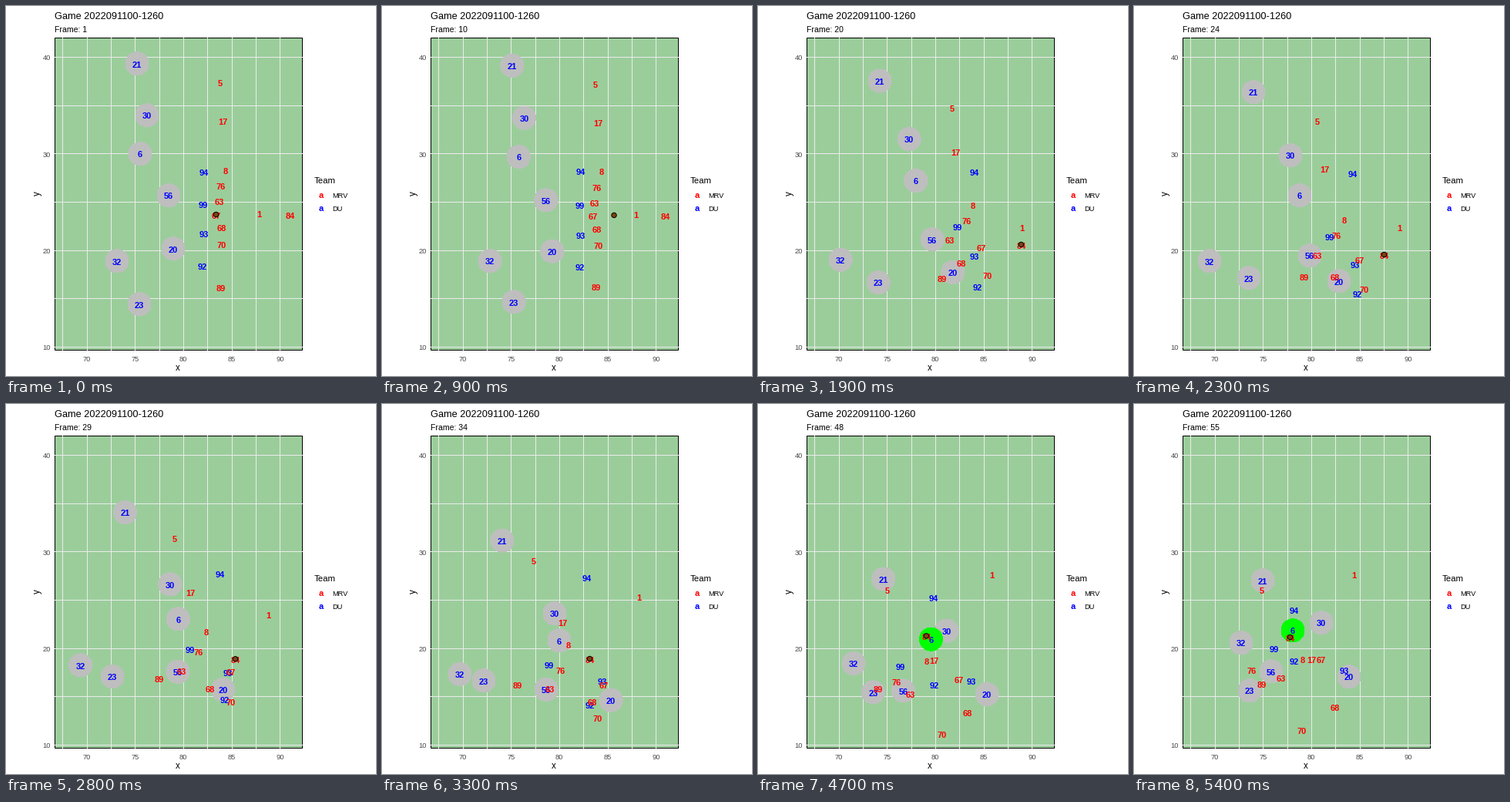
These frames come from a looping animation (480x480 px, 5.5 s). A matplotlib script:

```python
import numpy as np
import matplotlib.pyplot as plt
from matplotlib.animation import FuncAnimation
from matplotlib.patches import Circle, Rectangle

plt.rcParams["font.family"] = "Liberation Sans"

SIZE, DPI = 480, 72           # at 72 dpi one point is one pixel
FRAMES, INTERVAL = 55, 100
YARD = 12.53                  # pixels per yard
START, SNAP, CUT, HIT, END = 0, 7, 23, 40, 54
TURN = 33                     # extra turning point of those near the ball
REACH = 1.5 * YARD            # a defender this close to the ball turns green
RED, BLUE, GREY, GREEN = "#FF0000", "#0000FF", "#BEBEBE", "#00FF00"

fig = plt.figure(figsize=(SIZE / DPI, SIZE / DPI), dpi=DPI, facecolor="white")
ax = fig.add_axes([0, 0, 1, 1])
ax.set_xlim(0, SIZE)
ax.set_ylim(SIZE, 0)
ax.axis("off")


def px(x):
    return 104.7 + YARD * (x - 70)


def py(y):
    return 66.5 + YARD * (40 - y)


def write(x, y, text, size, color="black", ha="left", **kw):
    """Place text by its baseline."""
    return ax.text(x, y, text, size=size, color=color, ha=ha, va="baseline", **kw)


def grid_line(xs, ys):
    ax.plot(xs, ys, color="#EBEBEB", lw=1, zorder=1, snap=False, solid_capstyle="butt")


def smooth(a, b):
    """Eased 0 to 1 between frames a and b, as a column over all frames."""
    u = np.clip((np.arange(FRAMES) - a) / (b - a), 0, 1)[:, None]
    return u * u * (3 - 2 * u)


def path(points, drift=0):
    """Cubic curve through the points, at rest until the snap but for a small drift."""
    p = np.array(points, float)
    turns = [TURN] if len(p) == 5 else []
    t = np.array([START, SNAP, CUT, *turns, HIT, END], float)
    p = np.insert(p, 1, p[0] + drift * (p[1] - p[0]), axis=0)
    slope = np.gradient(p, t, axis=0)
    slope[:2] = 0

    f = np.arange(FRAMES)
    i = np.clip(np.searchsorted(t, f, side="right") - 1, 0, len(t) - 2)
    h = (t[i + 1] - t[i])[:, None]
    u = (f - t[i])[:, None] / h
    return ((1 + 2 * u) * (1 - u) ** 2 * p[i] + u * (1 - u) ** 2 * h * slope[i]
            + u * u * (3 - 2 * u) * p[i + 1] + u * u * (u - 1) * h * slope[i + 1])


# Field, grid and axes
ax.add_patch(Rectangle((63.5, 41.5), 321, 405, fc="#9BCD9B", ec="black", lw=1,
                       zorder=0, snap=False))
for x in np.arange(67.5, 91, 2.5):
    grid_line([round(px(x)) + 0.5] * 2, [41, 447])
for y in range(10, 41, 5):
    grid_line([63, 385], [int(py(y)) + 0.5] * 2)
for x in range(70, 91, 5):
    write(px(x), 461, str(x), 9.4, "#4D4D4D", "center")
for y in range(10, 41, 10):
    write(58, py(y) + 4, str(y), 9.4, "#4D4D4D", "right")
write(223, 473, "x", 11.5, ha="center")
ax.text(41, 243.5, "y", size=11.5, rotation=90, ha="center", va="center")

# Titles and legend
write(63, 17, "Game 2022091100-1260", 12.7)
counter = write(63, 34, "", 10.5)
write(400, 230, "Team", 11.4)
for y, color, team in [(249, RED, "MRV"), (266.5, BLUE, "DU")]:
    write(409, y, "a", 11, color, "center", weight="bold")
    write(423, y, team, 9.3)

tracks, labels, discs = {}, {}, {}


def player(number, color, points, drift=0):
    tracks[number] = path(points, drift)
    labels[number] = write(0, 0, str(number), 11, color, "center", weight="bold",
                           zorder=5 if color == RED else 4)


def back(number, *points):
    player(number, BLUE, points, drift=0.05)
    discs[number] = ax.add_patch(Circle((0, 0), 15, fc=GREY, lw=0, zorder=2, antialiased=False))


def lineman(number, *points):
    player(number, BLUE, points)


def offense(number, *points):
    player(number, RED, points)


# Key points in pixels: start, cut, (turn,) hit, end
back(21, (170, 76), (155, 113), (159, 218), (167, 230))
back(30, (183, 143), (203, 195), (224, 273), (241, 296), (243, 285))
back(6, (174, 193), (215, 247), (230, 308), (236, 313), (206, 295))
back(56, (211, 247), (228, 325), (199, 388), (178, 348))
back(20, (217, 316), (266, 358), (308, 393), (279, 355))
back(32, (144, 332), (98, 332), (111, 357), (139, 311))
back(23, (173, 388), (149, 354), (132, 360), (145, 373), (150, 373))

lineman(94, (257, 216), (284, 218), (246, 237), (208, 269))
lineman(99, (256, 258), (254, 301), (192, 355), (182, 319))
lineman(93, (257, 297), (287, 337), (281, 369), (273, 347))
lineman(92, (255, 338), (290, 375), (248, 390), (208, 334))

offense(5, (278, 101), (238, 150), (174, 235), (166, 242))
offense(17, (281, 151), (247, 212), (229, 325), (230, 333))
offense(8, (285, 214), (273, 278), (223, 331), (219, 333))
offense(76, (279, 235), (263, 299), (206, 368), (153, 347))
offense(63, (277, 254), (238, 325), (206, 388), (191, 357))
offense(67, (273, 272), (293, 331), (277, 375), (243, 333))
offense(68, (280, 289), (261, 352), (279, 403), (261, 394))
offense(70, (280, 310), (299, 368), (259, 428), (218, 424))
offense(89, (279, 366), (221, 353), (154, 373), (166, 365))
offense(1, (328.5, 271), (344, 288), (320, 227), (285, 223))
offense(84, (369, 272), (325, 324), (270, 332), (239, 308), (203, 304))

# The ball goes from center to passer, then to the runner
center, passer, runner = tracks[67], tracks[1], tracks[84]
ball_path = center + smooth(SNAP - 1, 12) * (passer - center)
ball_path += smooth(12, 20) * (runner - passer) + (-0.5, -1.5)
ball = ax.add_patch(Circle((0, 0), 3.2, fc="#7A4510", ec="black", lw=1, zorder=6))


def draw(frame):
    counter.set_text(f"Frame: {frame + 1}")
    spot = ball_path[frame]
    ball.center = spot
    for number, label in labels.items():
        label.set_position(tracks[number][frame] + (0, 3.5))
    for number, disc in discs.items():
        disc.center = tracks[number][frame] - (0, 1.2)
        near = np.hypot(*(disc.center - spot)) < REACH
        disc.set_facecolor(GREEN if near else GREY)


anim = FuncAnimation(fig, draw, frames=FRAMES, interval=INTERVAL, init_func=lambda: draw(0),
                     repeat=True, repeat_delay=0, blit=False)
plt.show()
```
